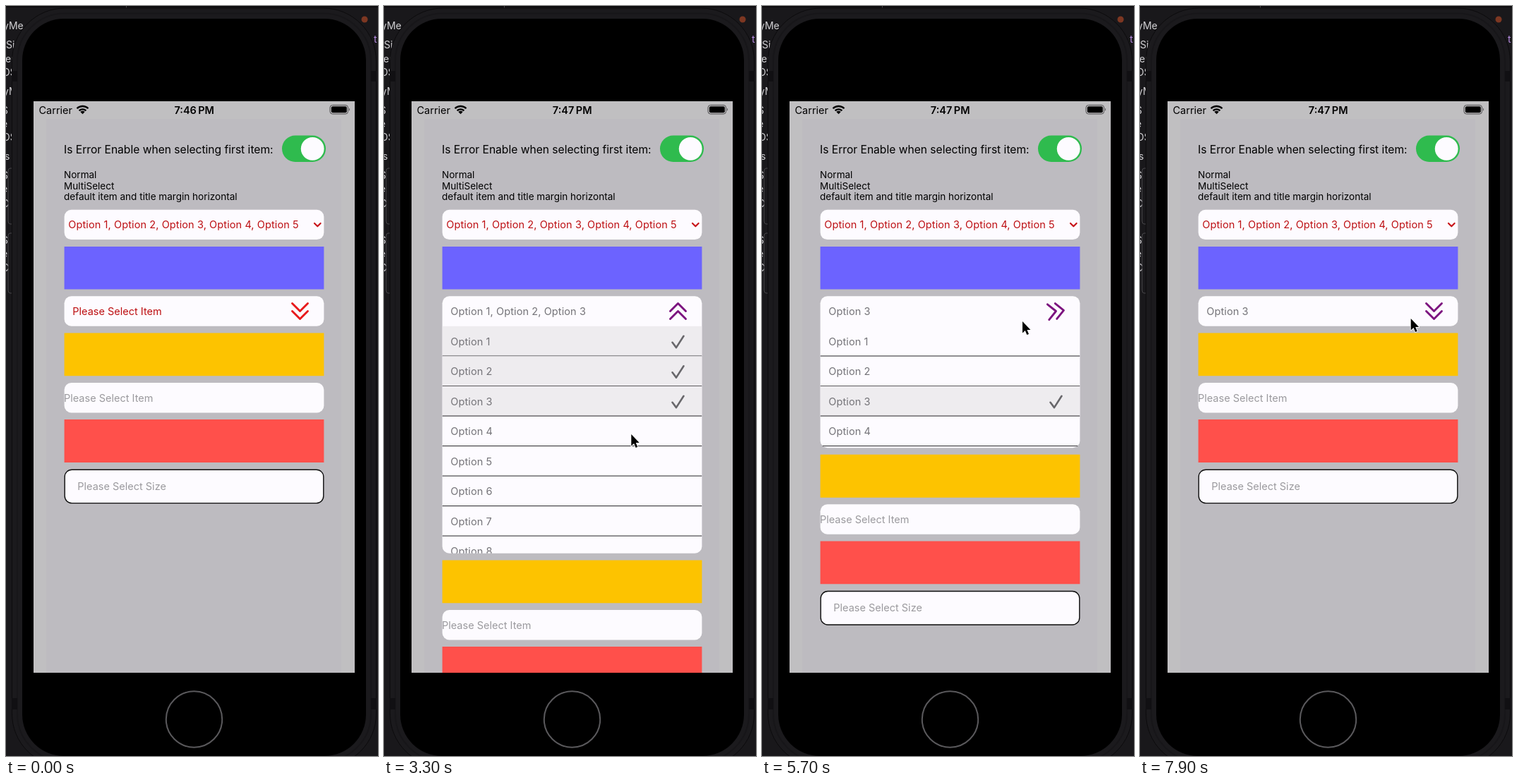
An HTML page for the animation above (8000 ms loop, 527x1063 px).

```html
<!DOCTYPE html>
<html lang="en">
<head>
<meta charset="utf-8">
<title>Dropdown demo</title>
<style>
  html, body { margin: 0; width: 100%; height: 100%; overflow: hidden; background: #19181b; }
  svg { display: block; width: 100vw; height: 100vh; }
  text { font: 14.5px Inter, Roboto, sans-serif; white-space: pre; }
  .code { font-size: 14px; fill: #d2d1d4; }
  .label { font-size: 13.55px; }
  .box { fill: #fdfbff; }
  .hint { fill: #9b9a9e; }
  .item { fill: #747378; letter-spacing: 0.1px; }
  .red { fill: #bd0f12; }
  .line { fill: none; stroke-linecap: round; stroke-linejoin: round; }
</style>
</head>
<body>
<svg viewBox="0 0 527 1063" preserveAspectRatio="none">
  <defs>
    <clipPath id="screen"><path d="M39 135H494V945H39Z"/></clipPath>
    <clipPath id="panel"><rect id="panelClip" x="82.6" y="411.3" width="367.8" rx="10"/></clipPath>
  </defs>

  <!-- desktop behind the phone -->
  <rect width="527" height="1063" fill="#19181b"/>
  <path d="M0 0H527V2H0Z" fill="#0d0c0e"/>
  <path d="M170 0h1v3h-1Z" fill="#444"/>
  <g id="code"></g>
  <path class="line" d="M12 230H6Q3 230 3 234V305Q3 309 6 309H12M12 322H6Q3 322 3 326V403Q3 407 6 407H12" stroke="#48474a"/>
  <circle cx="508" cy="19" r="4.5" fill="#7d3722"/>
  <text class="code" x="521" y="52" style="fill:#b58be0">t</text>

  <!-- phone body -->
  <rect x="8.5" y="3" width="516" height="1075" rx="75" fill="#1b1a1d" stroke="#0c0b0d"/>
  <rect x="16" y="10.5" width="501" height="1060" rx="67" fill="none" stroke="#171619" stroke-width="2"/>
  <path d="M8 92h8v15h-8ZM517 92h8v15h-8ZM8 981h8v16h-8ZM517 981h8v16h-8Z" fill="#111013"/>
  <rect x="23" y="18" width="487" height="1045" rx="59"/>
  <circle cx="266.5" cy="1011" r="39.7" fill="#000" stroke="#5a595c" stroke-width="2"/>

  <g clip-path="url(#screen)">
    <path d="M39 135H494V945H39Z" fill="#c0bfc1"/>
    <path d="M57 160H475V945H57Z" fill="#bdbbc0"/>

    <!-- status bar -->
    <text x="46.5" y="152.5">Carrier</text>
    <g transform="translate(108.5 153.3)">
      <path d="M0 0L-3.2 -3.3A4.6 4.6 0 0 1 3.2 -3.3Z"/>
      <path d="M-4.9 -4.9A6.9 6.9 0 0 1 4.9 -4.9M-8 -8A11.3 11.3 0 0 1 8 -8" fill="none" stroke="#000" stroke-width="2.3"/>
    </g>
    <text id="clock" x="266.7" y="152.5" text-anchor="middle" style="font-weight:600;word-spacing:-1.2px"></text>
    <rect x="459" y="140.5" width="25.5" height="12.5" rx="3.5" fill="none" stroke="#4c4b4d"/>
    <rect x="460.8" y="142.2" width="22" height="9" rx="2"/>
    <path d="M486 144.5Q488 146.7 486 149Z" fill="#4c4b4d"/>

    <!-- switch and first field -->
    <text x="82" y="209" style="font-size:15.6px">Is Error Enable when selecting first item:</text>
    <rect x="391" y="183.5" width="62" height="37.5" rx="18.75" fill="#2fbb4e"/>
    <circle cx="434.2" cy="202.3" r="16.4" class="box"/>
    <text class="label" x="82" y="244">Normal</text>
    <text class="label" x="82" y="259.7">MultiSelect</text>
    <text class="label" x="82" y="275.4">default item and title margin horizontal</text>
    <rect class="box" x="82.6" y="288.7" width="367.8" height="42.4" rx="10"/>
    <text class="item red" x="88.3" y="315">Option 1, Option 2, Option 3, Option 4, Option 5</text>
    <path class="line" d="M437 308L441.3 312.3L445.6 308" stroke="#c8151a" stroke-width="2.2"/>
    <path d="M82.6 340.9H450.4V401.6H82.6Z" fill="#6c63ff"/>

    <!-- expanding field -->
    <g clip-path="url(#panel)">
      <path class="box" d="M82 411H451V777H82Z"/>
      <g id="rows"></g>
      <text id="title" x="94.3" y="438.3"></text>
      <path id="arrow" class="line" d="M-11 -11L0 0L11 -11M-11 0L0 11L11 0" stroke-width="2.9"/>
    </g>

    <!-- pushed down by the panel -->
    <g id="below">
      <path d="M82.6 463.5H450.4V524.3H82.6Z" fill="#fdc300"/>
      <rect class="box" x="82.6" y="534" width="367.8" height="42.4" rx="10"/>
      <text class="hint" x="82" y="560.5">Please Select Item</text>
      <path d="M82.6 586.1H450.4V646.9H82.6Z" fill="#ff504b"/>
      <rect class="box" x="83.2" y="657.2" width="366.6" height="47.4" rx="10" stroke="#0c0c0c" stroke-width="1.4"/>
      <text class="hint" x="101.3" y="686">Please Select Size</text>
    </g>
  </g>

  <path id="cursor" d="M0 0V16.5L3.8 13L6.3 19L9 17.9L6.5 12.1H11.4Z" stroke="#fff" stroke-width="1.7" stroke-linejoin="round" paint-order="stroke"/>
</svg>

<script>
const $ = id => document.getElementById(id);
const LOOP = 8000, STEP = 100;
const ROW = 42.5, ROWS_TOP = 453.8, CLOSED = 42.5, TRAVEL = 322;
const OPEN_AT = 655, CLOSE_AT = 5477, SLIDE = 468, MINUTE_AT = 2200;

// option number: [selected from, selected until]
const picks = { 1: [1700, 4300], 2: [2300, 4900], 3: [2900, Infinity] };

// pointer: time, x, y
const track = [
  [100, 324, 686], [500, 372, 441], [900, 372, 441], [1400, 361, 485],
  [1800, 360, 485], [2200, 357, 525], [2400, 357, 525], [2800, 353, 567],
  [3000, 353, 567], [3300, 350.3, 607], [3500, 350.3, 607], [3800, 357, 476],
  [4300, 357, 476], [4600, 355, 508], [4900, 355, 508], [5300, 369, 447],
  [6300, 369, 447], [7000, 383.7, 443], [8000, 383.7, 443]
];

// clipped code lines at the left edge: text, x, baseline
const scraps = [
  ["yMe", -4, 33], ["Sir", 0, 60], ["er", -1, 80], ["OS", -5, 99], ["yM", -4, 126],
  ["S", -6, 153], ["e", -6, 172], ["OS", -5, 191], ["s", -2, 218],
  ["S", -6, 245], ["e", -6, 264], ["C", -6, 285], ["S", -6, 337], ["e", -6, 356], ["C", -6, 376]
];
$("code").innerHTML = scraps.map(([s, x, y]) =>
  `<text class="code" x="${x}" y="${y}">${s}</text>`).join("");

$("rows").innerHTML = Array.from({ length: 8 }, (_, i) => {
  const y = ROWS_TOP + i * ROW;
  return `<g transform="translate(82.5 ${y})">
    <g id="pick${i + 1}">
      <rect width="368" height="${ROW}" fill="#eeecef"/>
      <path class="line" d="M326 23L331.5 30.3L342 14" stroke="#68676b" stroke-width="2.6"/>
    </g>
    <text class="item" x="11.8" y="27">Option ${i + 1}</text>
    <rect y="${ROW - 0.8}" width="368" height="1.1" fill="#39383a"/>
  </g>`;
}).join("");

const ease = p => {
  p = Math.min(1, Math.max(0, p));
  return p * p * (3 - 2 * p);
};

function pointer(t) {
  const i = track.findIndex(k => k[0] > t);
  const [t0, x0, y0] = track[i - 1], [t1, x1, y1] = track[i];
  const p = ease((t - t0) / (t1 - t0));
  return [x0 + (x1 - x0) * p, y0 + (y1 - y0) * p];
}

function draw(t) {
  const open = ease((t - OPEN_AT) / SLIDE) - ease((t - CLOSE_AT) / SLIDE);
  $("panelClip").setAttribute("height", CLOSED + TRAVEL * open);
  $("below").setAttribute("transform", `translate(0 ${TRAVEL * open})`);
  $("clock").textContent = t < MINUTE_AT ? "7:46 PM" : "7:47 PM";

  const chosen = [];
  for (let n = 1; n <= 8; n++) {
    const [from, until] = picks[n] || [Infinity, 0];
    const on = t >= from && t < until;
    if (on) chosen.push("Option " + n);
    $("pick" + n).style.display = on ? "" : "none";
  }
  const empty = !chosen.length;
  $("title").textContent = empty ? "Please Select Item" : chosen.join(", ");
  $("title").setAttribute("class", empty ? "red" : "item");
  $("arrow").setAttribute("stroke", empty ? "#e8191b" : "#7c137f");
  $("arrow").setAttribute("transform", `translate(416.5 432.5) rotate(${-180 * open})`);

  const seen = t >= track[0][0];
  $("cursor").style.display = seen ? "" : "none";
  if (seen) $("cursor").setAttribute("transform", `translate(${pointer(t)})`);
}

const start = performance.now();
function tick() {
  const t = (performance.now() - start) % LOOP;
  draw(Math.floor(t / STEP) * STEP);
  requestAnimationFrame(tick);
}
tick();
</script>
</body>
</html>
```
